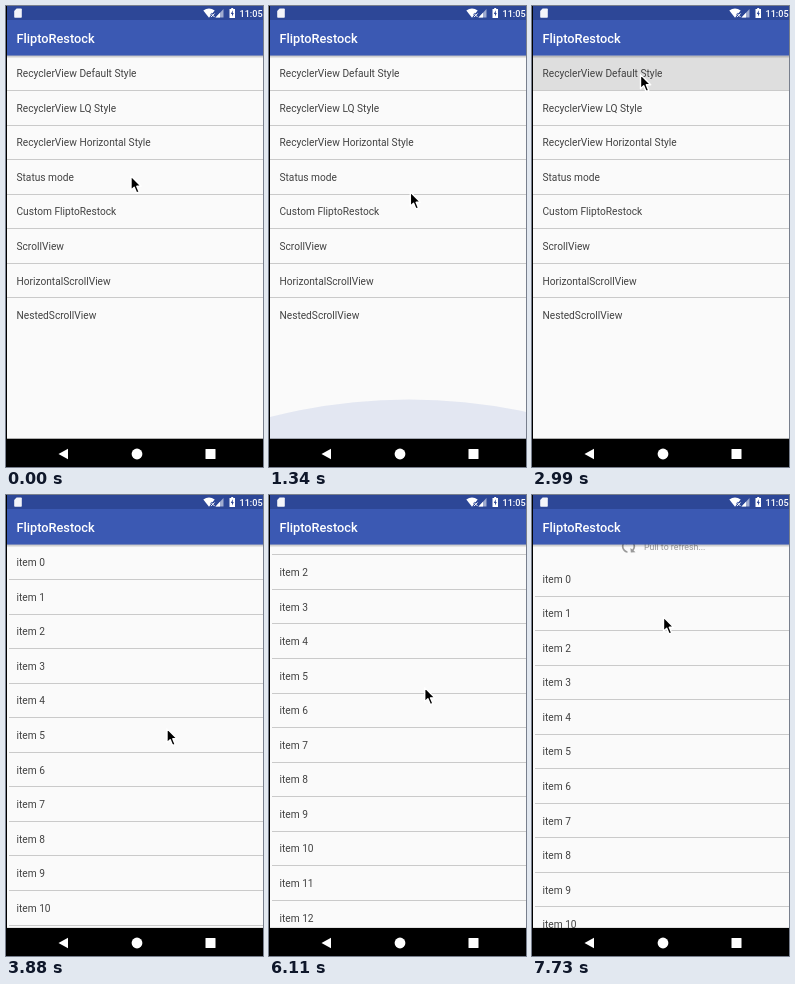
These frames come from a looping animation (257 px wide and 461 px high, 8 s). An HTML page:

```html
<!DOCTYPE html>
<html lang="en">
<head>
<meta charset="utf-8">
<title>List demo</title>
<style>
  html, body { margin: 0; width: 100%; height: 100%; overflow: hidden; background: #000; }
  svg { display: block; width: 100vw; height: 100vh; font-family: Roboto, "Liberation Sans", sans-serif; }
  .row { font-size: 10.18px; fill: #424242; }
  .line { fill: #cacaca; shape-rendering: crispEdges; }
  .title { font-size: 12.75px; font-weight: 500; fill: #fff; }
  .hint { font-size: 8.8px; fill: #999; }
</style>
</head>
<body>
<svg viewBox="0 0 257 461" xmlns="http://www.w3.org/2000/svg">
  <defs>
    <clipPath id="body"><rect x="1" y="49" width="256" height="384"/></clipPath>
    <linearGradient id="shade" x1="0" y1="0" x2="0" y2="1">
      <stop offset="0" stop-color="#000" stop-opacity=".24"/>
      <stop offset="1" stop-color="#000" stop-opacity="0"/>
    </linearGradient>
    <g id="bar">
      <rect x="1" y="14" width="256" height="35.6" fill="#3b59b3"/>
      <rect x="1" y="49.6" width="256" height="3" fill="url(#shade)"/>
      <text class="title" x="10.5" y="37.3">FliptoRestock</text>
    </g>
  </defs>

  <rect width="257" height="461"/>
  <g fill="#fff">
    <path d="M62 442.7V453.3L52.5 448Z"/>
    <circle cx="131" cy="448" r="5.4"/>
    <rect x="199.5" y="443" width="10" height="10" rx=".6"/>
  </g>

  <g>
    <rect x="1" y="14" width="256" height="418.7" fill="#fafafa"/>
    <rect id="press" x="1" y="50" width="256" height="34" fill="#dedede"/>
    <g id="menu"></g>
    <g clip-path="url(#body)"><circle id="glow" cx="140" r="560" fill="#3b59b3" opacity=".12"/></g>
    <use href="#bar"/>
  </g>

  <g id="listPage">
    <rect x="1" y="14" width="256" height="418.7" fill="#fafafa"/>
    <g clip-path="url(#body)">
      <g id="list">
        <path id="icon" fill="#999" d="M12 6v3l4-4-4-4v3c-4.42 0-8 3.58-8 8 0 1.57.46 3.03 1.24 4.26L6.7 14.8c-.45-.83-.7-1.79-.7-2.8 0-3.31 2.69-6 6-6zm6.76 1.74L17.3 9.2c.44.84.7 1.79.7 2.8 0 3.31-2.69 6-6 6v-3l-4 4 4 4v-3c4.42 0 8-3.58 8-8 0-1.57-.46-3.03-1.24-4.26z"/>
        <text id="hint" class="hint" y="38"></text>
      </g>
    </g>
    <use href="#bar"/>
  </g>

  <rect x="1" width="256" height="14" fill="#2d4797"/>
  <g fill="#fff">
    <path d="M10.6 2.5H15Q15.8 2.5 15.8 3.3V11Q15.8 11.8 15 11.8H9Q8.2 11.8 8.2 11V5Z" opacity=".95"/>
    <path d="M197.3 4.6Q203 .4 208.7 4.6L203 11.8Z"/>
    <path d="M217.5 3V11.5H209.5Z" opacity=".55"/>
    <path d="M214 6.7V11.5H209.5Z"/>
    <path d="M225.2 2H227.2V3H229V12H223.5V3H225.2Z"/>
    <text x="233.5" y="10.7" font-size="9.1" font-weight="500">11:05</text>
  </g>
  <path d="M205 7.5l3.6 3.6m0-3.6l-3.6 3.6" stroke="#2d4797" stroke-width="2.4"/>
  <path d="M205 7.5l3.6 3.6m0-3.6l-3.6 3.6" stroke="#fff"/>
  <path d="M226.8 4.3L224.8 8H226V10.6L227.8 7H226.8Z" fill="#2d4797"/>

  <path id="cursor" d="M0 0V14.2L3.2 11.2L5.6 17L8.2 15.9L5.8 10.3H10.2Z" stroke="#fff" stroke-width="1.4" stroke-linejoin="round"/>
</svg>
<script>
const LOOP = 8000, STEP = 148.8, PITCH = 34.55;
const OPEN = { press: 20, enter: 21, done: 22 };
const $ = id => document.getElementById(id);
const set = (el, attrs) => { for (const k in attrs) el.setAttribute(k, attrs[k]); };

function add(parent, tag, attrs, text = '') {
  const el = document.createElementNS('http://www.w3.org/2000/svg', tag);
  set(el, attrs);
  el.textContent = text;
  parent.append(el);
}

function addRows(parent, labels, left) {
  labels.forEach((label, i) => {
    const y = i * PITCH;
    add(parent, 'text', { class: 'row', x: 10.5, y: 71.2 + y }, label);
    if (i < labels.length - 1)
      add(parent, 'rect', { class: 'line', x: left, y: 84 + y, width: 257 - left, height: 1 });
  });
}

addRows($('menu'), [
  'RecyclerView Default Style', 'RecyclerView LQ Style', 'RecyclerView Horizontal Style',
  'Status mode', 'Custom FliptoRestock', 'ScrollView', 'HorizontalScrollView', 'NestedScrollView'
], 1);
addRows($('list'), Array.from({ length: 24 }, (_, i) => 'item ' + i), 3);

// Each gesture moves the pointer, and sometimes the list, then rests until the next one.
const gestures = [
  { from: 0, to: 7, pointer: [[125, 170], [134, 59], [148, 280]] },
  { from: 8, to: 14, pointer: [[148, 206], [128, 146], [97.5, 80.5]] },
  { from: 15, to: 16, pointer: [[108.5, 68.5]] },
  { from: 26, to: 29, pointer: [[161, 233.5], [166, 96]], scroll: [[0], [-4 * PITCH]] },
  { from: 33, to: 34, pointer: [[192, 285], [188, 230]], scroll: [[-187.4], [-7 * PITCH]] },
  { from: 36, to: 43, pointer: [[178, 120], [160, 262], [150, 100]], scroll: [[-6 * PITCH], [0]] },
  { from: 45, to: 52, pointer: [[143, 162], [137, 190], [131.5, 122]], scroll: [[70], [92], [16.5]] }
];

// Point at progress p (0..1) along evenly timed stops.
function along(stops, p) {
  const pos = p * (stops.length - 1), i = Math.floor(pos);
  const a = stops[i], b = stops[i + 1] || a;
  return a.map((v, k) => v + (b[k] - v) * (pos - i));
}

function draw(time) {
  const step = Math.max(0, Math.floor((time - 140) / STEP) + 1);
  const { from, to, pointer, scroll = [[0]] } = gestures.filter(g => g.from <= step).pop();
  const p = Math.min(1, (step - from) / (to - from));

  set($('cursor'), { transform: `translate(${along(pointer, p)})` });

  const swell = Math.min(1, Math.max(0, (step - 7) / 5));
  set($('glow'), { cy: 433 + 560 - 41.5 * Math.sin(Math.PI * swell) });
  set($('press'), { visibility: step >= OPEN.press && step < OPEN.done ? 'visible' : 'hidden' });

  const entering = step < OPEN.done;
  set($('listPage'), {
    visibility: step >= OPEN.enter ? 'visible' : 'hidden',
    opacity: entering ? .7 : 1,
    transform: `translate(0 ${entering ? 14 : 0})`
  });

  const [dy] = along(scroll, p), ready = dy >= 60;
  set($('list'), { transform: `translate(0 ${dy})` });
  $('hint').textContent = ready ? 'Release to refresh...' : 'Pull to refresh...';
  set($('hint'), { x: ready ? 103.5 : 112 });
  set($('icon'), {
    transform: `translate(${ready ? 87 : 96.5} 34.8) rotate(${ready ? 0 : -50}) scale(.83) translate(-12 -12)`
  });
}

const start = performance.now();
function loop() {
  draw((performance.now() - start) % LOOP);
  requestAnimationFrame(loop);
}
loop();
</script>
</body>
</html>
```
